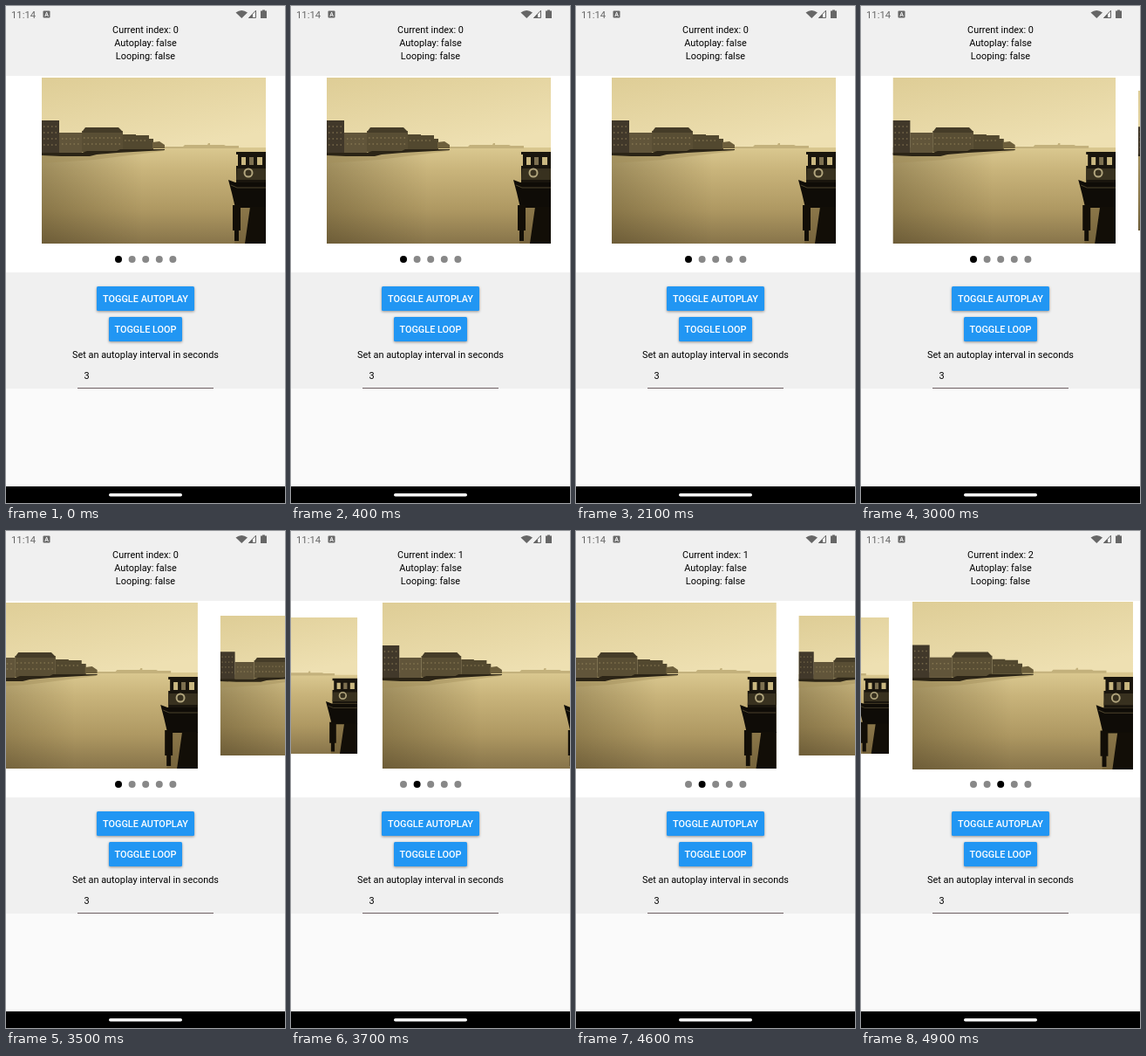
An HTML page for the animation above (5000 ms loop, 320 by 569 pixels).

```html
<!DOCTYPE html>
<html lang="en">
<head>
<meta charset="utf-8">
<title>Carousel</title>
<style>
  html, body { margin: 0; width: 100%; height: 100%; overflow: hidden; background: #fafafa; }
  #stage { display: block; width: 100vw; height: 100vh; }
  text { font: 10.9px Roboto, sans-serif; text-anchor: middle; fill: #000; }
  .start { text-anchor: start; }
  .button rect { fill: #2196f3; filter: drop-shadow(0 1.3px 1.6px #0006); }
  .button text { font-weight: 500; fill: #fff; }
  .status { fill: #666; }
  .clock { font-size: 11.3px; }
</style>
</head>
<body>
<svg id="stage" viewBox="0 0 320 569">
  <defs>
    <linearGradient id="sky" x2=".6" y2="1">
      <stop offset="0" stop-color="#decd96"/><stop offset="1" stop-color="#eee0b2"/>
    </linearGradient>
    <linearGradient id="water" x2="0" y2="1">
      <stop offset="0" stop-color="#dac890"/><stop offset=".25" stop-color="#c8b37a"/>
      <stop offset=".65" stop-color="#ae9862"/><stop offset="1" stop-color="#87744a"/>
    </linearGradient>
    <linearGradient id="shade">
      <stop offset="0" stop-color="#2a2008" stop-opacity=".28"/>
      <stop offset=".45" stop-color="#2a2008" stop-opacity="0"/>
    </linearGradient>
    <g id="photo">
      <path fill="url(#sky)" d="M0 0H257V81H0z"/>
      <path fill="url(#water)" d="M0 80H257V190H0z"/>
      <path fill="url(#shade)" d="M0 80H257V190H0z"/>
      <path fill="#c3b17c" d="M138 79h24l2-2h26l1-2h2v2h16l2 1h15v3H138z"/>
      <!-- quay -->
      <path fill="#a08c59" d="M0 88H60L140 82V84L60 94 0 98z" opacity=".4"/>
      <path fill="#61553a" d="M20 63H46V86H20z"/>
      <path fill="#41382a" d="M0 49H20V88H0z"/>
      <path fill="#594e34" d="M46 61H93V85H46z"/>
      <path fill="#453c28" d="M47 61l3-4H88l4 4v2H47z"/>
      <path fill="#52482f" d="M93 65H108V66H123V70H128V82H93z"/>
      <path fill="#6d5f3c" d="M127 74l8-1 6 4v4H127z"/>
      <path stroke="#9c8b60" stroke-width="1.500" stroke-dasharray="1.500 3" d="M2 56H18M2 63H18M2 70H18M2 77H18M23 70H44M23 76H44M48 69H92M48 76H92M95 72H122" opacity=".6"/>
      <path fill="#2b2416" d="M0 86H46l6-2h34l4-2h51v1l-54 3-24 2-8 2H22L0 89z"/>
      <!-- tug -->
      <path fill="#66542f" d="M227 148H242V190H221z" opacity=".5"/>
      <path fill="#19150d" d="M223 85H257V120H223V101H225V88H223z"/>
      <path fill="#c9b780" d="M229 91h5v9h-5zM247 91h6v9h-6z"/>
      <path fill="#7d7050" d="M238 91h5v9h-5z"/>
      <path fill="#38311f" d="M224 104H257V117H223z"/>
      <circle cx="237" cy="109" r="4.500" fill="none" stroke="#b0a47c" stroke-width="2"/>
      <path fill="#0f0c07" d="M214 117l8 3H257V149H222l-4-17z"/>
      <path stroke="#4c432c" d="M217 123l7 3H257" fill="none"/>
      <path fill="#120e07" d="M219 146h9v29h-2v12h-5v-12h-2zM239 148H257V190H233z"/>
    </g>
  </defs>

  <path fill="#f0f0f0" d="M0 0H320V80H0zM0 305H320V438H0z"/>
  <path fill="#fff" d="M0 80H320V305H0z"/>
  <g id="slides"></g>
  <g id="dots"></g>

  <text class="start status clock" x="6" y="14">11:14</text>
  <rect class="status" x="42.500" y="5.500" width="8" height="8" rx="1"/>
  <text x="46.500" y="12" style="font-size:7px;font-weight:700;fill:#f0f0f0">A</text>
  <g class="status">
    <path d="M263.500 7.500Q270.300 2.500 277 7.500L270.300 14z"/>
    <path d="M283 9V14H278z"/>
    <path d="M286.500 5.200V13.500H278.500z" fill="none" stroke="#666"/>
    <path d="M292 5.500h2V4.500h3v1h2V14h-7z"/>
  </g>

  <text id="index" x="160" y="31"></text>
  <text x="160" y="46">Autoplay: false</text>
  <text x="160" y="61">Looping: false</text>

  <g class="button"><rect x="104" y="321" width="112" height="28" rx="1.500"/><text x="160" y="339">TOGGLE AUTOPLAY</text></g>
  <g class="button"><rect x="118" y="356" width="84" height="28" rx="1.500"/><text x="160" y="374">TOGGLE LOOP</text></g>
  <text x="160" y="403">Set an autoplay interval in seconds</text>
  <text class="start" x="89.500" y="426.500">3</text>
  <path fill="#6e6063" d="M82 437H238V438H82z"/>

  <path d="M0 550H320V569H0z"/>
  <rect x="118" y="558" width="84" height="3.500" rx="1.750" fill="#fff"/>
</svg>
<script>
const LOOP = 5000, STEP = 100, PITCH = 262, CENTER = 169.5, MIDDLE = 177;
// time in ms, scroll position in slides
const SCROLL = [[0, 0], [2900, 0], [3000, .02], [3200, .08], [3500, .295], [3600, .6], [3800, .94],
  [4000, 1], [4100, 1], [4200, 1.035], [4400, 1.1], [4700, 1.32], [4800, 1.47], [4900, 1.939], [5000, 2]];
// active width, active height, resting width
const SIZES = [[257, 190, 217], [250, 190, 217], [253, 192, 223], [256, 190, 217]];

const el = id => document.getElementById(id);
const mix = (a, b, k) => a + (b - a) * k;
const clamp = x => Math.max(0, Math.min(1, x));

function set(node, attrs) {
  for (const key in attrs) node.setAttribute(key, attrs[key]);
}
function add(parent, tag, attrs) {
  const node = document.createElementNS('http://www.w3.org/2000/svg', tag);
  set(node, attrs);
  return parent.appendChild(node);
}

const slides = SIZES.map(() => {
  const slide = add(el('slides'), 'svg', { viewBox: '0 0 257 190', preserveAspectRatio: 'none' });
  add(slide, 'use', { href: '#photo' });
  return slide;
});
const dots = [0, 1, 2, 3, 4].map(i => add(el('dots'), 'circle', { cx: 129 + i * 15.6, cy: 290, r: 4 }));

function scrollAt(t) {
  const i = SCROLL.findIndex(key => key[0] > t);
  const [t0, p0] = SCROLL[i - 1], [t1, p1] = SCROLL[i];
  return mix(p0, p1, (t - t0) / (t1 - t0));
}

function draw(now) {
  const t = Math.floor(now % LOOP / STEP) * STEP;
  const pos = scrollAt(t), active = Math.round(pos);
  slides.forEach((slide, i) => {
    const d = i - pos, focus = clamp((.6 - Math.abs(d)) / .2);
    const [w, h, restW] = SIZES[i];
    const squeeze = i ? 0 : 1.5 * clamp(pos * 50);
    const width = mix(restW, w - squeeze, focus);
    const height = mix(d < 0 ? 156 : 160, h, focus);
    set(slide, { x: CENTER + d * PITCH - width / 2, y: MIDDLE - height / 2, width, height });
  });
  dots.forEach((dot, i) => set(dot, { fill: i === active ? '#000' : '#888' }));
  el('index').textContent = 'Current index: ' + active;
}

function tick() {
  draw(performance.now());
  requestAnimationFrame(tick);
}
tick();
</script>
</body>
</html>
```
